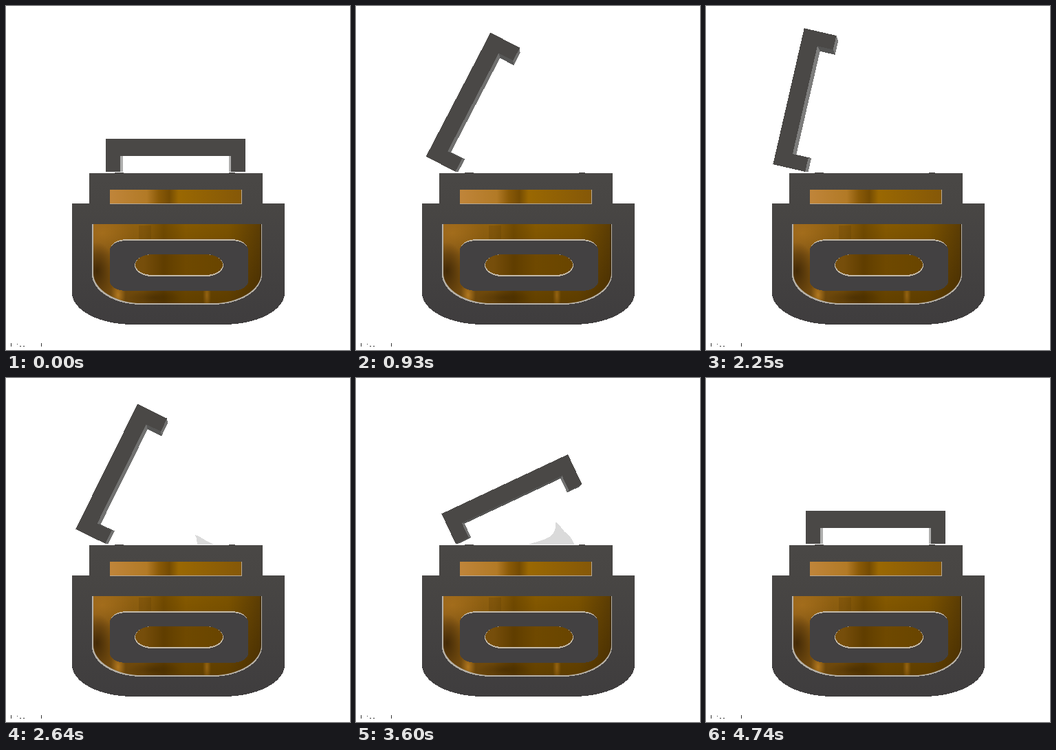
Recreate the animation shown at these times as an HTML page. Size 500 px wide and 500 px high, loop 7500 ms.

```html
<!DOCTYPE html>
<html lang="en">
<head>
<meta charset="utf-8">
<title>Jar</title>
<style>
  html, body { margin: 0; width: 100%; height: 100%; overflow: hidden; background: #fff; }
  svg { display: block; width: 100vw; height: 100vh; shape-rendering: crispEdges; }
</style>
</head>
<body>
<svg viewBox="0 0 500 500">
  <defs>
    <linearGradient id="metal" gradientUnits="userSpaceOnUse" x1="0" y1="190" x2="0" y2="462">
      <stop offset="0" stop-color="#4b4947"/>
      <stop offset=".35" stop-color="#484644"/>
      <stop offset="1" stop-color="#3f3d3e"/>
    </linearGradient>
    <linearGradient id="neckGlass" gradientUnits="userSpaceOnUse" x1="151" y1="0" x2="343" y2="0">
      <stop offset="0" stop-color="#c0853a"/>
      <stop offset=".28" stop-color="#b27a26"/>
      <stop offset=".37" stop-color="#8a5a08"/>
      <stop offset=".45" stop-color="#744b02"/>
      <stop offset=".52" stop-color="#9a6802"/>
      <stop offset="1" stop-color="#855808"/>
    </linearGradient>
    <linearGradient id="bodyGlass" gradientUnits="userSpaceOnUse" x1="126" y1="0" x2="372" y2="0">
      <stop offset="0" stop-color="#94621a"/>
      <stop offset=".3" stop-color="#8f600e"/>
      <stop offset=".42" stop-color="#714a00"/>
      <stop offset=".55" stop-color="#855900"/>
      <stop offset=".8" stop-color="#7c5300"/>
      <stop offset="1" stop-color="#5a3c04"/>
    </linearGradient>
    <linearGradient id="shade" gradientUnits="userSpaceOnUse" x1="0" y1="317" x2="0" y2="433">
      <stop offset="0" stop-color="#2c1a00" stop-opacity="0"/>
      <stop offset="1" stop-color="#2c1a00" stop-opacity=".4"/>
    </linearGradient>
    <radialGradient id="glow">
      <stop offset="0" stop-color="#c88724"/>
      <stop offset="1" stop-color="#c88724" stop-opacity="0"/>
    </radialGradient>
    <radialGradient id="dusk">
      <stop offset="0" stop-color="#2c1a00"/>
      <stop offset="1" stop-color="#2c1a00" stop-opacity="0"/>
    </radialGradient>
    <clipPath id="inside">
      <path d="M127 317H371V388A71 44 0 0 1 300 432H198A71 44 0 0 1 127 388Z"/>
    </clipPath>
    <clipPath id="above"><rect width="500" height="242"/></clipPath>
  </defs>

  <g clip-path="url(#above)">
    <path id="scoop" fill="#dadada" d="M160 275L169 243C174 236 177 228 181 225Q186 221 198 225L246 243L275 255V275Z"/>
    <path id="swirl" fill="#dadada" d="M236 275V250Q241 246 248 242C256 237 266 235 274 230C284 225 289 217 286 204C295 209 297 215 305 220C314 225 313 232 325 243L334 254V275Z"/>
  </g>

  <g id="sides"></g>
  <path id="lid" fill="#4a4846"/>

  <g fill="#484644">
    <rect x="158" y="242" width="13" height="2"/>
    <rect x="324" y="242" width="9" height="2"/>
  </g>
  <path fill="url(#metal)" d="M121 243H373V287H405V417A89 46 0 0 1 316 463H185A89 46 0 0 1 96 417V287H121Z"/>
  <rect x="151" y="267" width="192" height="21" fill="#b9aa94"/>
  <rect x="151" y="267" width="191" height="20" fill="url(#neckGlass)"/>

  <path fill="#b5b0a7" d="M125 317H372V390A72 44 0 0 1 300 434H197A72 44 0 0 1 125 390Z"/>
  <g clip-path="url(#inside)">
    <rect x="126" y="317" width="247" height="117" fill="url(#bodyGlass)"/>
    <rect x="126" y="317" width="247" height="117" fill="url(#shade)"/>
    <ellipse cx="140" cy="330" rx="45" ry="32" fill="url(#glow)" opacity=".35"/>
    <ellipse cx="132" cy="385" rx="26" ry="42" fill="url(#dusk)" opacity=".7"/>
    <ellipse cx="163" cy="420" rx="11" ry="22" fill="url(#glow)" opacity=".75"/>
    <ellipse cx="215" cy="424" rx="38" ry="12" fill="url(#dusk)" opacity=".35"/>
    <ellipse cx="292" cy="420" rx="6" ry="24" fill="url(#glow)" opacity=".5"/>
    <rect x="193" y="319" width="18" height="20" fill="#4a2e00" opacity=".18"/>
    <rect x="369" y="317" width="3" height="85" fill="#3d2a10" opacity=".6"/>
  </g>

  <rect x="152" y="339" width="199" height="72" rx="24" ry="14" fill="#c3b9a8"/>
  <path fill="#434142" fill-rule="evenodd" d="M175 341H328A24 14 0 0 1 352 355V400A24 14 0 0 1 328 414H175A24 14 0 0 1 151 400V355A24 14 0 0 1 175 341Z"/>
  <rect x="187" y="361" width="129" height="32" rx="25" ry="16" fill="#c3b9a8"/>
  <rect x="188" y="361" width="127" height="30" rx="25" ry="15" fill="url(#bodyGlass)"/>
  <rect x="188" y="361" width="127" height="30" rx="25" ry="15" fill="#2c1a00" opacity=".25"/>

  <path fill="#333" d="M7 490h1v5h-1zM16 491h1v1h-1zM20 494h2v1h-2zM25 494h2v1h-2zM51 490h1v5h-1z"/>
</svg>
<script>
  const LOOP = 7500, STEP = 30, OPEN = 1470, SHUT = 4740;
  const hinge = [144.5, 241.5], eye = [250, 235], depth = 0.043;
  // Lid corners, measured from the hinge while closed
  const outline = [[0, 0], [0, -48], [203, -48], [203, 0], [182, 0], [182, -23.5], [21, -23.5], [21, 0]]
    .map(([x, y]) => [x + 0.5, y - 0.5]);

  const el = id => document.getElementById(id);
  const clamp = v => Math.max(0, Math.min(1, v));
  const smooth = v => { v = clamp(v); return v * v * (3 - 2 * v); };
  const pathOf = pts => 'M' + pts.map(p => p.map(v => v.toFixed(2)).join(' ')).join('L') + 'Z';

  const sides = outline.map(() => {
    const p = document.createElementNS('http://www.w3.org/2000/svg', 'path');
    el('sides').appendChild(p);
    return p;
  });

  // Rows of [time, dx, dy, turn]
  const scoopKeys = [[840, -8, 30, -12], [1350, 0, 0, 0], [1860, 12, 30, 12]];
  const swirlKeys = [[2280, -6, 46, -24], [3000, 0, 0, 0], [3600, 0, 5, 6], [4500, 0, 46, 12]];

  function lidAngle(t) {
    return 90 * (t < OPEN ? smooth(t / OPEN) : 1 - smooth((t - OPEN) / (SHUT - OPEN)));
  }

  function drawLid(deg) {
    const a = deg * Math.PI / 180, c = Math.cos(a), s = Math.sin(a);
    const front = outline.map(([x, y]) => [hinge[0] + x * c + y * s, hinge[1] - x * s + y * c]);
    const back = front.map(p => p.map((v, i) => v + (eye[i] - v) * depth));
    front.forEach((p, i) => {
      const j = (i + 1) % front.length, q = front[j];
      const dx = q[0] - p[0], dy = q[1] - p[1], len = Math.hypot(dx, dy);
      const nx = dy / len, ny = -dx / len;
      const seen = nx * (eye[0] - p[0]) + ny * (eye[1] - p[1]) > 0;
      const tone = Math.round(84 + (deg < 8 ? 90 : 45) * nx ** 4);
      sides[i].setAttribute('d', seen ? pathOf([p, q, back[j], back[i]]) : '');
      sides[i].setAttribute('fill', `rgb(${tone},${tone},${tone - 1})`);
    });
    el('lid').setAttribute('d', pathOf(front));
  }

  function place(id, keys, t, cx) {
    const i = keys.findIndex((k, n) => n < keys.length - 1 && t >= k[0] && t < keys[n + 1][0]);
    el(id).style.display = i < 0 ? 'none' : '';
    if (i < 0) return;
    const a = keys[i], b = keys[i + 1], u = smooth((t - a[0]) / (b[0] - a[0]));
    const [dx, dy, turn] = [1, 2, 3].map(n => a[n] + (b[n] - a[n]) * u);
    el(id).setAttribute('transform', `translate(${dx} ${dy}) rotate(${turn} ${cx} 243)`);
  }

  const start = performance.now();
  function draw(now) {
    const t = Math.floor((Math.max(0, now - start) % LOOP) / STEP) * STEP;
    drawLid(lidAngle(t));
    place('scoop', scoopKeys, t, 205);
    place('swirl', swirlKeys, t, 286);
    requestAnimationFrame(draw);
  }
  draw(start);
</script>
</body>
</html>
```
